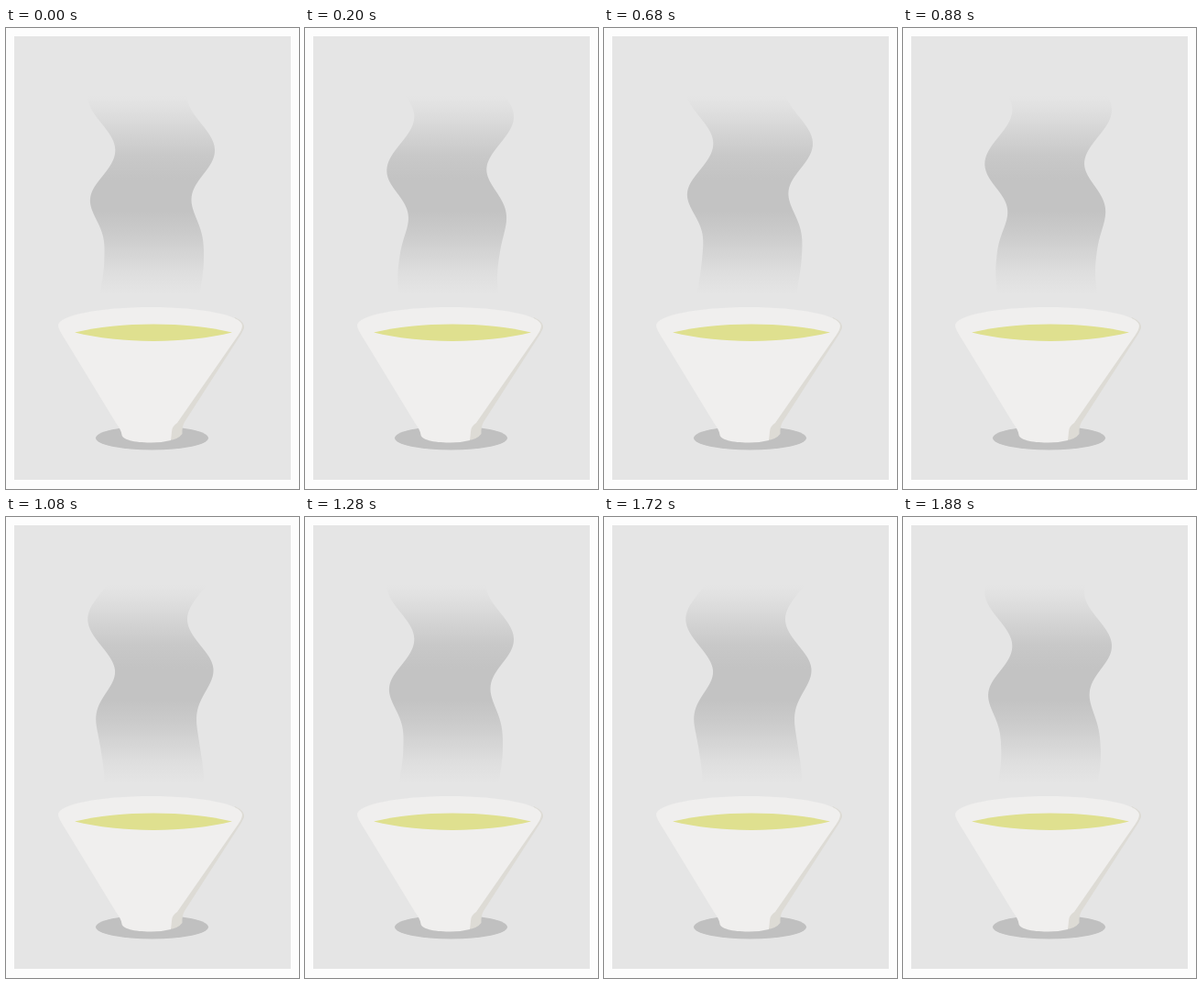
An HTML page for the animation above (1920 ms loop, 320 by 502 pixels).

```html
<!DOCTYPE html>
<html lang="en">
<head>
<meta charset="utf-8">
<title>Steaming tea</title>
<style>
  html, body { margin: 0; width: 100%; height: 100%; overflow: hidden; background: #fdfdfd; }
  svg { display: block; width: 320px; height: 502px; }
</style>
</head>
<body>
<svg viewBox="0 0 320 502">
  <defs>
    <linearGradient id="fade" gradientUnits="userSpaceOnUse" x1="0" y1="74" x2="0" y2="290">
      <stop offset="0" stop-color="#c3c3c3" stop-opacity="0"/>
      <stop offset=".07" stop-color="#c3c3c3" stop-opacity=".16"/>
      <stop offset=".3" stop-color="#c3c3c3" stop-opacity=".84"/>
      <stop offset=".42" stop-color="#c3c3c3"/>
      <stop offset=".58" stop-color="#c3c3c3"/>
      <stop offset=".7" stop-color="#c3c3c3" stop-opacity=".75"/>
      <stop offset=".9" stop-color="#c3c3c3" stop-opacity=".18"/>
      <stop offset="1" stop-color="#c3c3c3" stop-opacity="0"/>
    </linearGradient>
  </defs>
  <rect x="9" y="9" width="302" height="483" fill="#e5e5e5"/>
  <path id="steam" fill="url(#fade)"/>
  <ellipse cx="159.5" cy="446.5" rx="61.5" ry="13" fill="#c0c0c0"/>
  <path fill="#dddbd5" d="M250 315Q261 320 260 327L257 333L195 429Q192 434 192.500 442Q188 448 178 449L178 430Z"/>
  <path fill="#f0efee" d="M57 324C57 313 102 304 158 304S258 313 258 324Q258 328 254 334L187 430Q181 434 181 440L180 449Q170 451.500 158 451.500C140 451.500 127 448 126.500 443Q126 438 120 430L65 340Q57 328 57 324Z"/>
  <path fill="#dfe08f" d="M75 331.500C125 319.500 197 319.500 247 331.500C197 344 125 344 75 331.500Z"/>
</svg>
<script>
const PERIOD = 640, STEP = 40, WAVE = 117.5;
const steam = document.getElementById('steam');

// Sway is full at the top and settles between y = from and y = to.
function sway(y, from, to) {
  const u = Math.min(1, Math.max(0, (y - from) / (to - from)));
  return 15 - 12 * u * u * (3 - 2 * u);
}

function draw(now) {
  const t = Math.floor(now / STEP) * STEP % PERIOD;
  const crest = 192 - WAVE * t / PERIOD;
  const left = [], right = [];
  for (let y = 72; y <= 292; y += 2) {
    const c = Math.cos(2 * Math.PI * (y - crest) / WAVE);
    left.push(`${(104.3 - sway(y, 162, 255) * c).toFixed(2)} ${y}`);
    right.unshift(`${(213 - sway(y, 145, 252) * c).toFixed(2)} ${y}`);
  }
  steam.setAttribute('d', `M${left.concat(right).join('L')}Z`);
}

function tick() {
  draw(performance.now());
  requestAnimationFrame(tick);
}
tick();
</script>
</body>
</html>
```
